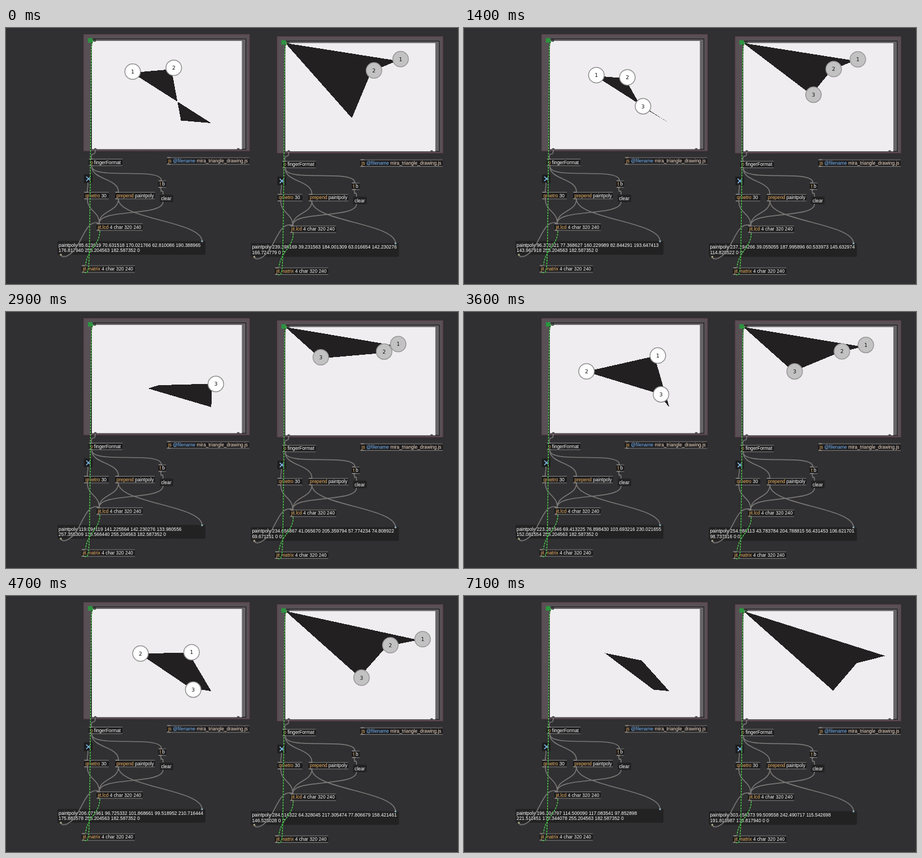
An HTML page that plays this animation: 800x455 px, repeating every 7200 ms.

```html
<!DOCTYPE html>
<html lang="en">
<head>
<meta charset="utf-8">
<title>Triangle drawing patch</title>
<style>
html, body { margin: 0; width: 100%; height: 100%; overflow: hidden; background: #302f31; }
svg { display: block; width: 800px; height: 455px; }
text { font: 8.35px "Liberation Sans", Arial, sans-serif; fill: #fff; white-space: pre; }
.name { fill: #f0b768; }
.attr { fill: #7bbcff; }
.value { fill: #f8e1cd; }
.cord { fill: none; stroke: #787775; stroke-width: 1.7; }
.signal { fill: none; stroke: #2a4a2c; stroke-width: 1.6; }
.dash { fill: none; stroke: #56cf57; stroke-width: 1.4; stroke-dasharray: 3 2; }
.poly { fill: #222021; shape-rendering: crispEdges; }
.finger text { font: 9.3px "DejaVu Sans", sans-serif; fill: #111; text-anchor: middle; }
</style>
</head>
<body>
<svg id="stage" viewBox="0 0 800 455">
  <defs>
    <pattern id="grid" width="12.5" height="12.5" patternUnits="userSpaceOnUse">
      <rect x="6" y="6" width="1" height="1" fill="#3b3a3c"/>
    </pattern>
  </defs>
  <rect width="800" height="455" fill="#302f31"/>
  <rect width="800" height="455" fill="url(#grid)"/>
</svg>
<script>
const LOOP = 7200, STEP = 100, LINE = 62, UP = true;

// Each path: [ms, x, y] in 320 x 240 units; UP lifts the finger until the next point.
const patches = [
  {
    x: 0, y: 0, fill: '#fefefe', edge: '#8f8f8f', tail: [255.204563, 182.587352, 0],
    paths: [
      [[700, 85, 70], [2000, 107, 84], [2900, 119, 141, UP], [3400, 227, 65], [5400, 196, 114, UP]],
      [[0, 170, 62], [2000, 157, 91], [2900, 142, 133, UP], [3400, 72, 104], [5400, 117, 97, UP]],
      [[0, 190, 176, UP], [300, 91, 166], [2000, 249, 131], [2900, 257, 130], [4300, 204, 174], [5400, 221, 179, UP]]
    ]
  },
  {
    x: 342.4, y: 3.8, fill: '#c3c2c3', edge: '#989798', tail: [0, 0],
    paths: [
      [[700, 239, 39], [2900, 234, 41], [4300, 274, 45], [5400, 303, 99, UP]],
      [[0, 184, 63], [2000, 189, 59], [2900, 205, 57], [4300, 204, 56], [5400, 242, 115, UP]],
      [[0, 142, 166, UP], [300, 237, 139], [2000, 96, 101], [2900, 74, 69], [5400, 191, 176, UP]]
    ]
  }
];

const rect = (x, y, w, h, fill, more = '') =>
  `<rect x="${x}" y="${y}" width="${w}" height="${h}" fill="${fill}" ${more}/>`;

const label = (x, y, parts) => `<text x="${x}" y="${y}">` +
  parts.map(([s, cls = '']) => `<tspan class="${cls}">${s}</tspan>`).join('') + '</text>';

const object = (x, y, w, ...parts) =>
  rect(x, y, w, 13.5, '#1c1b1c') +
  [0, 11.7].map(dy => rect(x, y + dy, w, 2, '#5c5b5c') + rect(x + 1, y + dy, 6, 1.5, '#8b8985')).join('') +
  label(x + 2.4, y + 9.5, parts);

// Cords leave and enter vertically, and sag more the longer they are.
function wire(x1, y1, x2, y2) {
  const sag = 12 + (y2 - y1) * .2 + Math.abs(x2 - x1) * .06;
  return cord(`M${x1} ${y1}C${x1} ${y1 + sag} ${x2} ${y2 - sag} ${x2} ${y2}`);
}
const cord = d => `<path class="cord" d="${d}"/>`;
const signal = d => `<path class="signal" d="${d}"/><path class="dash" d="${d}"/>`;

const screen = () =>
  rect(138, 11.8, 292.5, 206.2, '#585055', 'stroke="#604651" stroke-width="1.5"') +
  rect(151.5, 19.5, 273, 196, '#686568', 'stroke="#1b191b" stroke-width="1.2"') +
  rect(152, 23, 265.5, 192.5, '#efedef') +
  rect(145, 18, 8, 8, '#2d9440') +
  '<circle cx="157" cy="22" r="2" fill="#4e4d4e" stroke="#222"/>' +
  '<path d="M155.5 216a2.5 2.5 0 0 1 5 0zM408.5 216a2.5 2.5 0 0 1 5 0z" fill="#444344"/>';

const objects = () =>
  object(146.5, 232, 59.5, ['p', 'name'], [' fingerFormat']) +
  object(284.5, 229.5, 146, ['js', 'name'], [' @filename', 'attr'], [' mira_triangle_drawing.js', 'value']) +
  rect(138, 260.5, 15, 15, '#1d1c1d') +
  '<path d="M142 264l8 8m0-8l-8 8" stroke="#7fbcec" stroke-width="1.7"/>' +
  object(138, 291, 44, ['qmetro', 'name'], [' 30']) +
  object(193, 291, 70.5, ['prepend', 'name'], [' paintpoly']) +
  object(269.5, 270.7, 14, ['t', 'name'], [' b']) +
  rect(272, 296, 24, 13.5, '#232223', 'rx="2"') +
  label(274.6, 305.8, [['clear']]) +
  object(160, 347, 82, ['jit.lcd', 'name'], [' 4 char 320 240']) +
  rect(91, 378.5, 262, 24.5, '#232223', 'rx="2"') +
  '<text class="line" x="93" y="388.6"/><text class="line" x="93" y="398.2"/>' +
  object(133.5, 421.5, 94.5, ['jit.matrix', 'name'], [' 4 char 320 240']);

const cords = () =>
  wire(158, 216, 151, 232) +
  wire(152, 246, 275, 271) +
  wire(152, 246, 199, 291) +
  wire(145, 275, 144, 291) +
  wire(144, 304, 165, 347) +
  wire(199, 304, 165, 347) +
  wire(199, 304, 347, 379) +
  wire(278, 309, 165, 347) +
  wire(274, 284, 278, 296) +
  cord('M97 402C98 412 116 406 128 384C140 362 147 341 165 347') +
  '<circle cx="97" cy="403" r="1.8" fill="#aaa583"/><circle cx="347" cy="379" r="1.8" fill="#87a9b3"/>' +
  signal('M166 361C166 386 143 394 141 421') +
  signal('M139 434C149 442 147 415 149 290L150.8 60C151 36 150 22 157 22');

const finger = (p, i) =>
  `<g class="finger"><circle r="13.8" fill="${p.fill}" stroke="${p.edge}" stroke-width="1.5"/>` +
  `<text y="3.4">${i + 1}</text></g>`;

const stage = document.getElementById('stage');
for (const p of patches) {
  const g = document.createElementNS('http://www.w3.org/2000/svg', 'g');
  g.setAttribute('transform', `translate(${p.x} ${p.y})`);
  g.innerHTML = screen() + '<polygon class="poly"/>' + objects() + cords() +
    p.paths.map((_, i) => finger(p, i)).join('');
  stage.append(g);
  p.poly = g.querySelector('.poly');
  p.lines = g.querySelectorAll('.line');
  p.fingers = g.querySelectorAll('.finger');
}

function locate(path, t) {
  const next = path.findIndex(k => k[0] > t);
  const a = path.at(next < 0 ? -1 : Math.max(0, next - 1));
  const b = path[next] ?? a;
  const up = a[3] === UP;
  const f = up || a === b ? 0 : (t - a[0]) / (b[0] - a[0]);
  return { x: a[1] + (b[1] - a[1]) * f, y: a[2] + (b[2] - a[2]) * f, up };
}

// Whole units follow the path; a hash of the position supplies the decimals.
function reading(v) {
  const hash = Math.abs(Math.sin(v * 12.9898) * 43758.5453) % 1;
  return (Math.floor(v) + hash * .999).toFixed(6);
}

function wrap(words) {
  const lines = ['', ''];
  let row = 0;
  for (const w of words) {
    if (!row && lines[0].length + 1 + w.length > LINE) row = 1;
    lines[row] += (lines[row] && ' ') + w;
  }
  return lines;
}

function drawPatch(p, t) {
  const nums = [];
  p.fingers.forEach((el, i) => {
    const { x, y, up } = locate(p.paths[i], t);
    nums.push(reading(x), reading(y));
    el.setAttribute('transform', `translate(${151.4 + x * .856} ${18.7 + y * .84})`);
    el.style.display = up ? 'none' : '';
  });
  nums.push(...p.tail);
  const points = [0, 2, 4, 6].map(i => `${152 + nums[i] * .828},${23 + nums[i + 1] * .8}`);
  p.poly.setAttribute('points', points.join(' '));
  wrap(['paintpoly', ...nums.map(String)]).forEach((s, i) => p.lines[i].textContent = s);
}

let start;
function frame(now) {
  start ??= now;
  const t = Math.floor((now - start + 16) % LOOP / STEP) * STEP;
  patches.forEach(p => drawPatch(p, t));
  requestAnimationFrame(frame);
}
patches.forEach(p => drawPatch(p, 0));
requestAnimationFrame(frame);
</script>
</body>
</html>
```
